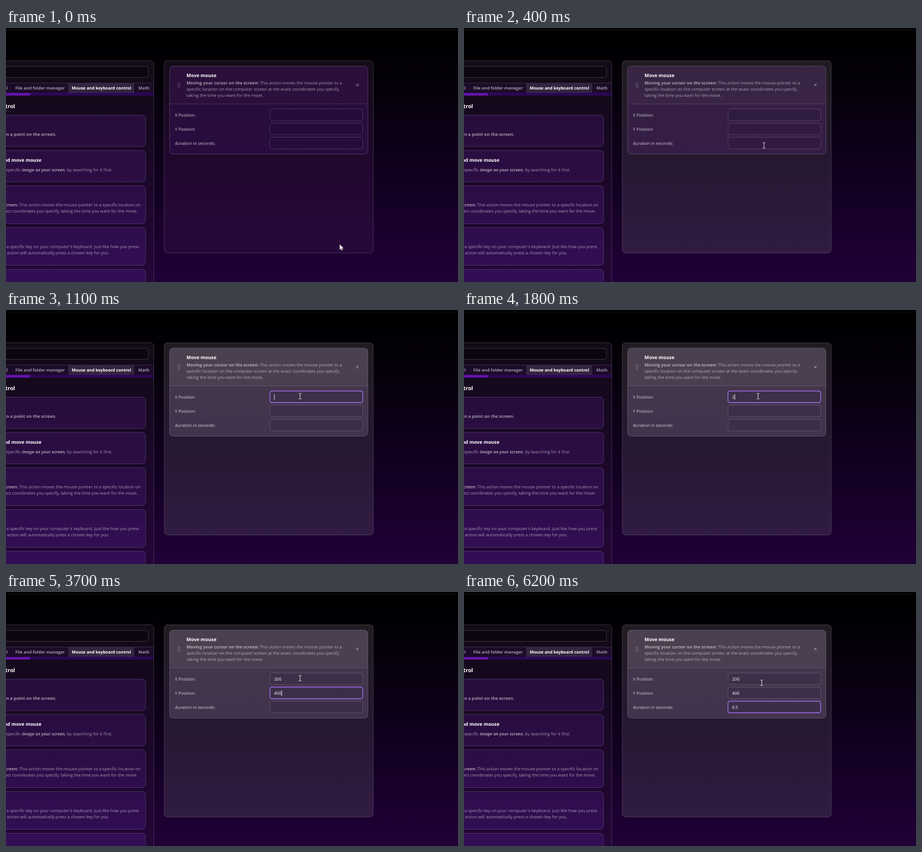
Write an HTML page that moves like this. It is 800 px wide and 450 px high and loops after 6300 ms.

```html
<!DOCTYPE html>
<html lang="en">
<head>
<meta charset="utf-8">
<title>Move mouse action</title>
<style>
  html, body { margin: 0; width: 100%; height: 100%; overflow: hidden; background: #000; }
  svg { display: block; width: 800px; height: 450px; }
  text { font: 7.55px "Open Sans", "Noto Sans", sans-serif; fill: #fff; text-rendering: geometricPrecision; }
  .end { text-anchor: end; }
  .bold { font-weight: 700; }
  .title { font-weight: 700; font-size: 8.4px; }
  .tab { font-weight: 700; font-size: 7.4px; }
  .muted { fill: rgba(255, 255, 255, .57); }
  .label { fill: rgba(255, 255, 255, .76); }
  .edge { fill: none; stroke: rgba(255, 255, 255, .17); }
</style>
</head>
<body>
<svg viewBox="0 0 800 450">
  <defs>
    <linearGradient id="page" x2="0" y2="1">
      <stop stop-color="#000"/><stop offset=".2" stop-color="#040008"/><stop offset="1" stop-color="#200038"/>
    </linearGradient>
    <linearGradient id="side" x2="0" y2="1">
      <stop stop-color="#120b16"/><stop offset=".25" stop-color="#16081f"/><stop offset="1" stop-color="#240639"/>
    </linearGradient>
    <linearGradient id="panel" x2="0" y2="1">
      <stop stop-color="#140b18"/><stop offset=".5" stop-color="#1f082c"/><stop offset="1" stop-color="#27083c"/>
    </linearGradient>
    <linearGradient id="panelHover" x2="0" y2="1">
      <stop stop-color="#201c22"/><stop offset=".5" stop-color="#261830"/><stop offset="1" stop-color="#301b42"/>
    </linearGradient>
    <linearGradient id="item" gradientUnits="userSpaceOnUse" x1="0" y1="155" x2="0" y2="450">
      <stop stop-color="#260d3a"/><stop offset="1" stop-color="#330e55"/>
    </linearGradient>
    <linearGradient id="card" x2="0" y2="1">
      <stop stop-color="#2a1039"/><stop offset="1" stop-color="#2c0e43"/>
    </linearGradient>
    <linearGradient id="cardHover" x2="0" y2="1">
      <stop stop-color="#4b404f"/><stop offset="1" stop-color="#4a3b53"/>
    </linearGradient>
  </defs>

  <rect width="800" height="450" fill="url(#page)"/>
  <path d="M0 3.5H800" stroke="#141216"/>

  <!-- action library -->
  <rect x="-20" y="58" width="281.5" height="420" rx="6" fill="url(#side)"/>
  <rect x="-20" y="68" width="272" height="19.5" rx="4" fill="#0c0610" stroke="#3a3040"/>
  <rect y="97" width="261" height="23" fill="#1d0b2a"/>
  <rect x="110" y="97.5" width="117" height="17.5" fill="#33243f"/>
  <path d="M0 97.5H261" stroke="#362a40"/>
  <rect y="115" width="261" height="4.5" fill="#2c075a"/>
  <rect x="-10" y="115.2" width="52.5" height="4.2" rx="1" fill="#6a14b4"/>
  <rect class="edge" x="-20" y="58" width="281.5" height="420" rx="6"/>
  <text class="tab muted end" x="3" y="109.4">Internal</text>
  <text class="tab muted" x="16.5" y="109.4">File and folder manager</text>
  <text class="tab" x="116.3" y="109.4">Mouse and keyboard control</text>
  <text class="tab muted" x="234.3" y="109.4">Math</text>
  <text class="bold end" x="16" y="141.5" style="font-size:9.6px">Mouse and keyboard control</text>
  <g id="items" fill="url(#item)" stroke="#4a3160"></g>
  <text class="bold muted end" x="89" y="190.7">Click on a point on the screen.</text>
  <text class="title end" x="62.7" y="237">Search image and move mouse</text>
  <text class="muted end" x="188.5" y="253.6">Finds a specific <tspan class="bold" font-style="italic">image on your screen</tspan>, by searching for it first.</text>
  <text class="muted end" x="238" y="316.2"><tspan class="bold">Moving your cursor on the screen:</tspan> This action moves the mouse pointer to a specific location on</text>
  <text class="muted end" x="233" y="327.4">the computer screen at the exact coordinates you specify, taking the time you want for the move.</text>
  <text class="muted end" x="235.6" y="390">Presses a specific key on your computer's keyboard. Just like how you press</text>
  <text class="muted end" x="183" y="401.2">This action will automatically press a chosen key for you.</text>

  <!-- workflow panel -->
  <rect x="280" y="58" width="370" height="340.5" rx="6" fill="url(#panel)"/>
  <rect id="panelGlow" x="280" y="58" width="370" height="340.5" rx="6" fill="url(#panelHover)"/>
  <rect class="edge" x="280" y="58" width="370" height="340.5" rx="6"/>
  <rect x="289.5" y="67.5" width="351" height="156" rx="6" fill="url(#card)"/>
  <rect id="cardGlow" x="289.5" y="67.5" width="351" height="156" rx="6" fill="url(#cardHover)"/>
  <path d="M290 134.5H640V217.5a6 6 0 0 1-6 6H296a6 6 0 0 1-6-6Z" fill="rgba(20,0,40,.13)"/>
  <rect class="edge" x="289.5" y="67.5" width="351" height="156" rx="6"/>
  <path d="M290 134.5H640" stroke="rgba(255,255,255,.12)"/>
  <path d="M304.7 97v9M307.5 97v9" stroke="rgba(255,255,255,.55)" stroke-width="1.1" stroke-dasharray="1.1 1.4"/>
  <path d="M619.7 98.7l4.6 4.6m0-4.6l-4.6 4.6" stroke="rgba(255,255,255,.65)" stroke-width=".8"/>
  <text class="title" x="319.5" y="87">Move mouse</text>
  <text class="muted" x="319.5" y="99.6"><tspan class="bold">Moving your cursor on the screen:</tspan> This action moves the mouse pointer to a</text>
  <text class="muted" x="319.5" y="110.8">specific location on the computer screen at the exact coordinates you specify,</text>
  <text class="muted" x="319.5" y="122">taking the time you want for the move.</text>
  <g id="fields"></g>
  <path id="caret" stroke="#fff" stroke-width=".8"/>

  <path id="arrow" d="M0 0V10.2L2.4 8L4 11.6L5.7 10.8L4.1 7.4H7.2Z" fill="#fff" stroke="#222" stroke-width=".4"/>
  <path id="beam" d="M-2.3-4.8H-.6L0-4.2L.6-4.8H2.3M0-4.2V4.2M-2.3 4.8H-.6L0 4.2L.6 4.8H2.3" fill="none" stroke="#eee" stroke-width=".9"/>
</svg>
<script>
  const LOOP = 6300, STEP = 100, BLINK = 530;
  const $ = id => document.getElementById(id);
  const clamp = v => Math.max(0, Math.min(1, v));

  $("items").innerHTML = [[154.5, 55.5], [217, 55.5], [279.5, 67], [353.5, 67], [427.5, 67]]
    .map(([y, h]) => `<rect x="-20" y="${y}" width="267" height="${h}" rx="6"/>`).join("");

  // keys: [time, value after the key press]
  const fields = [
    { label: "X Position:", y: 143.5, focus: 1000, blur: 2600, keys: [[1800, "2"], [2000, "20"], [2200, "200"]] },
    { label: "Y Position:", y: 168.5, focus: 2600, blur: 4000, keys: [[3300, "4"], [3500, "40"], [3700, "400"]] },
    { label: "duration in seconds:", y: 193.5, focus: 4000, blur: LOOP, keys: [[4600, "0"], [5100, "0."], [5300, "0.5"]] }
  ];
  for (const f of fields) {
    const g = document.createElementNS("http://www.w3.org/2000/svg", "g");
    const box = `x="467.3" y="${f.y}" width="164" height="20.5" rx="3.5"`;
    g.innerHTML = `<text class="label" x="299" y="${f.y + 13.2}">${f.label}</text>
      <rect ${box} fill="rgba(20,0,40,.12)" stroke="rgba(255,255,255,.16)"/>
      <rect ${box} fill="none" stroke="#9a6ae0" stroke-width="1.4"/>
      <text x="474.5" y="${f.y + 13.6}"></text>`;
    $("fields").append(g);
    f.ring = g.children[2];
    f.text = g.children[3];
  }

  // pointer waypoints: [time, x, y]
  const path = [[0, 590.5, 383], [100, 578, 345], [200, 560, 295], [300, 543, 246], [400, 531, 208],
    [500, 523.3, 186.3], [600, 520.5, 171], [700, 520.5, 157], [800, 520.5, 152.7],
    [5400, 520.5, 152.7], [5500, 524.5, 157.5], [5600, 527, 160.8], [LOOP, 527, 160.8]];

  function pointerAt(t) {
    const i = Math.max(1, path.findIndex(p => p[0] >= t));
    const [t0, x0, y0] = path[i - 1], [t1, x1, y1] = path[i];
    const k = (t - t0) / (t1 - t0);
    return [x0 + (x1 - x0) * k, y0 + (y1 - y0) * k];
  }

  function draw(t) {
    $("panelGlow").setAttribute("opacity", clamp(t / 300));
    $("cardGlow").setAttribute("opacity", clamp((t - 310) / 200));

    $("caret").setAttribute("opacity", 0);
    for (const f of fields) {
      const typed = f.keys.filter(k => k[0] <= t).pop() || [f.focus, ""];
      f.text.textContent = typed[1];
      f.ring.setAttribute("opacity", clamp((t - f.focus + 100) / 200) * (1 - clamp((t - f.blur + 100) / 200)));
      if (t >= f.focus && t < f.blur) {
        const x = 475 + (typed[1] ? f.text.getComputedTextLength() : 0);
        $("caret").setAttribute("d", `M${x} ${f.y + 5.6}v10`);
        $("caret").setAttribute("opacity", Math.floor((t - typed[0]) / BLINK) % 2 ? 0 : 1);
      }
    }

    const [x, y] = pointerAt(t), overField = y < 215;
    $("arrow").setAttribute("opacity", overField ? 0 : 1);
    $("beam").setAttribute("opacity", overField ? 1 : 0);
    for (const id of ["arrow", "beam"]) $(id).setAttribute("transform", `translate(${x} ${y})`);
  }

  const start = performance.now();
  function tick() {
    const t = (performance.now() - start) % LOOP;
    draw(Math.floor(t / STEP) * STEP);
    requestAnimationFrame(tick);
  }
  tick();
</script>
</body>
</html>
```
